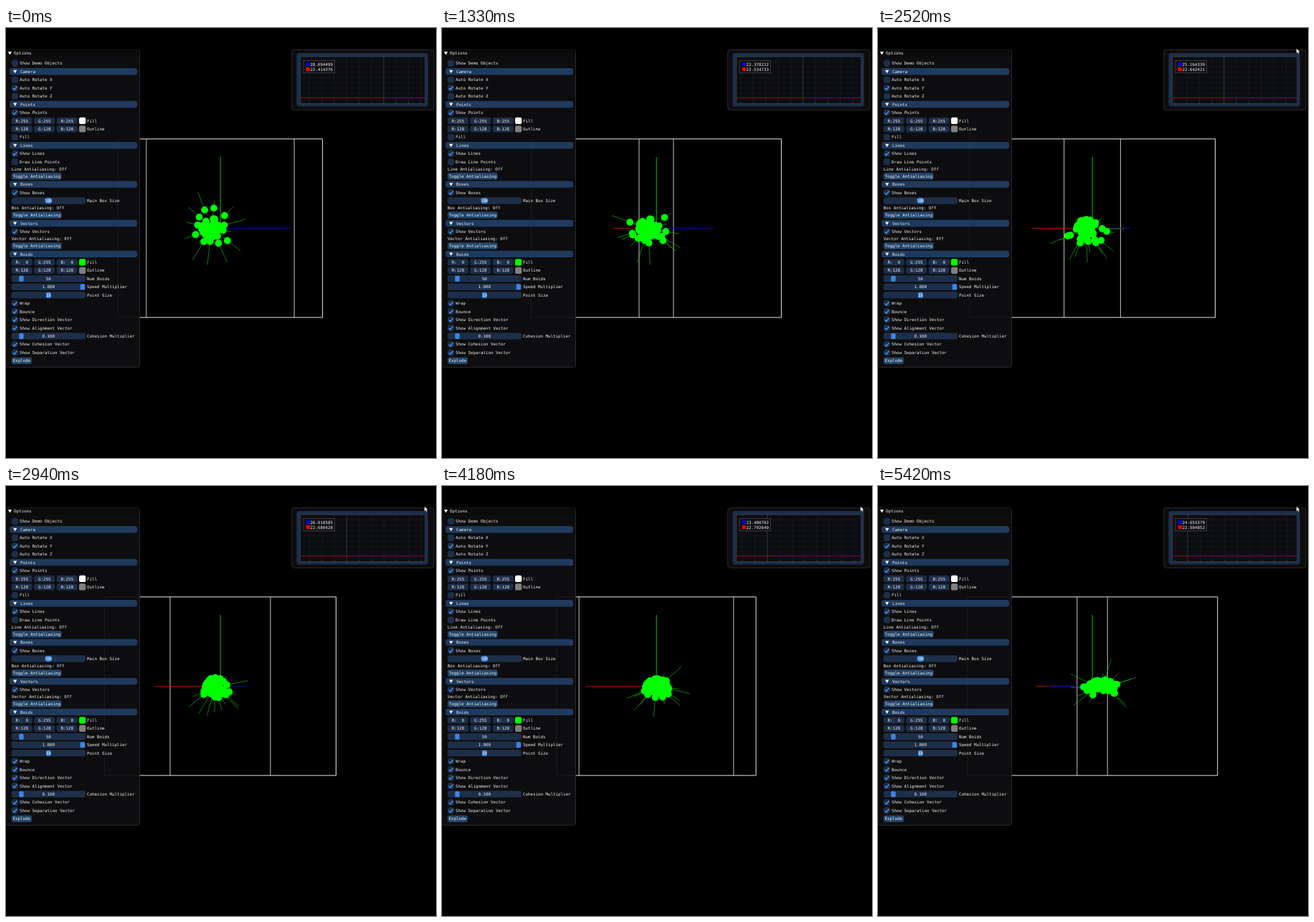
An HTML page for the animation above (5450 ms loop, 600x600 px).

```html
<!DOCTYPE html>
<html lang="en">
<head>
<meta charset="utf-8">
<title>Boids</title>
<style>
html, body { margin: 0; width: 100%; height: 100%; overflow: hidden; background: #000; }
svg { display: block; width: 100vw; height: 100vh; }
text { font: 5.82px "DejaVu Sans Mono", monospace; fill: #f2f2f2; white-space: pre; text-rendering: geometricPrecision; }
.mid { text-anchor: middle; }
.line { fill: none; stroke-width: 1; }
.thin { fill: none; stroke-width: .7; }
.win { fill: rgba(14,14,16,.94); stroke: #3c3c42; stroke-width: .7; }
</style>
</head>
<body>
<svg id="stage" viewBox="0 0 600 600">
  <g class="line">
    <path id="inner" stroke="#c4c4c4"/>
    <path id="outer" stroke="#e6e6e6"/>
    <path id="xAxis" stroke="#c00000"/>
    <path id="zAxis" stroke="#0c0cb0"/>
    <path d="M299.2 279.4V180" stroke="#00c800"/>
  </g>
  <path id="rays" class="thin" stroke="#18b018"/>
  <path id="dots" fill="#0f0"/>
  <g id="panel"></g>
  <g transform="translate(-.6 0)">
    <rect class="win" x="399.3" y="30.3" width="198.4" height="84" rx="4"/>
    <rect x="406" y="35" width="183.5" height="74.5" rx="4" fill="#1d2e48"/>
    <rect x="411.5" y="40" width="174" height="65.5" fill="#0c0d11"/>
    <clipPath id="plotClip"><rect x="411.5" y="40" width="174" height="66"/></clipPath>
    <g clip-path="url(#plotClip)" class="thin">
      <path id="rows" stroke="#15171c"/>
      <path id="minor" stroke="#1c1e24"/>
      <path id="ticks" stroke="#555862"/>
      <path id="major" stroke="#3c3f48"/>
      <path d="M411 97.4H586" stroke="#c4001c"/>
      <path id="trace" stroke="#1a00e0" stroke-opacity=".62"/>
    </g>
    <rect x="411.5" y="40" width="174" height="65.5" class="thin" stroke="#42454e"/>
    <rect x="415.7" y="45.3" width="43.6" height="17.5" fill="#101013" stroke="#55555c" stroke-width=".6"/>
    <rect x="419.4" y="48" width="5" height="5" fill="#00f"/>
    <rect x="419.4" y="55" width="5" height="5" fill="#f00"/>
    <text id="blueValue" x="425" y="52.7"/>
    <text id="redValue" x="425" y="59.6"/>
  </g>
  <path id="cursor" d="M0 0V7.2L1.7 5.6 2.9 8 4.1 7.4 3 5.1H5.2Z" fill="#fff" stroke="#000" stroke-width=".4"/>
</svg>
<script>
const LOOP = 5450, TAU = 2 * Math.PI;
const MID = { x: 299, y: 279.4, half: 124.5, axis: 100 };
const $ = id => document.getElementById(id);
const draw = (id, d) => $(id).setAttribute('d', d);
const lerp = (a, b, p) => a + (b - a) * p;
const range = n => Array.from({ length: n }, (_, i) => i);

/* ---------- options panel: widgets flow downwards ---------- */
const FRAME = '#1d2e48', GRAB = '#3d85e0', MARK = '#4296fa';
const ROW = 11.45, TEXT_ROW = 10, LEFT = 7.7, SIZE = 9.4, FIELD = 103.3;
let y = 35;
const next = (step = ROW) => { y += step; return ''; };

const box = (x, w, h, fill, r = 3) =>
  `<rect x="${x}" y="${y - h / 2}" width="${w}" height="${h}" rx="${r}" fill="${fill}"/>`;
const label = (x, s, cls = '') => `<text x="${x}" y="${y + 2.1}" class="${cls}">${s}</text>`;
const arrow = x => `<path d="M${x - 2.6} ${y - 2}h5.2l-2.6 4.4z" fill="#fff"/>`;

const header = s => next() + box(5, 178, SIZE, '#1f3a5d') + arrow(12.6) + label(20, s);
const check = (s, on = true) => next() + box(LEFT, SIZE, SIZE, FRAME, 4) + label(19, s) +
  (on ? `<path d="M9.6 ${y + .3}l2 2.2 3.8-4.6" fill="none" stroke="${MARK}" stroke-width="1.4"/>` : '');
const button = (s, w) => box(LEFT, w, SIZE, '#234469') + label(9.4, s);
const slider = (s, value, part, grab = 6.4) => next() + box(LEFT, FIELD, SIZE, FRAME) +
  box(LEFT + 1 + part * (FIELD - 2 - grab), grab, 8, GRAB, 1.5) + label(59.3, value, 'mid') + label(113, s);
const color = (s, rgb) => next() + rgb.map((v, i) =>
  box(LEFT + i * 31.5, 29, SIZE, FRAME) +
  label(22.2 + i * 31.5, 'RGB'[i] + ':' + String(v).padStart(3), 'mid')).join('') +
  box(102, 9.2, 9.2, `rgb(${rgb})`, 2) + label(113, s);
const toggle = s => next(TEXT_ROW) + label(LEFT, s + ' Antialiasing: Off') +
  next(TEXT_ROW) + button('Toggle Antialiasing', 70);

const GRAY = [128, 128, 128];
$('panel').innerHTML = [
  '<rect class="win" x="-.4" y="30.3" width="186.8" height="443" rx="3"/>',
  box(0, 186, SIZE, '#0a0a0a'), arrow(5.4), label(11, 'Options'),
  next(2.85), check('Show Demo Objects', false),
  header('Camera'),
  check('Auto Rotate X', false), check('Auto Rotate Y'), check('Auto Rotate Z', false),
  header('Points'),
  check('Show Points'), color('Fill', [255, 255, 255]), color('Outline', GRAY), check('Fill', false),
  header('Lines'),
  check('Show Lines'), check('Draw Line Points', false), toggle('Line'),
  header('Boxes'),
  check('Show Boxes'), slider('Main Box Size', '500', .5, 7.5), toggle('Box'),
  header('Vectors'),
  check('Show Vectors'), toggle('Vector'),
  header('Boids'),
  color('Fill', [0, 255, 0]), color('Outline', GRAY),
  slider('Num Boids', '50', .1), slider('Speed Multiplier', '1.000', 1), slider('Point Size', '10', .5),
  check('Wrap'), check('Bounce'), check('Show Direction Vector'), check('Show Alignment Vector'),
  slider('Cohesion Multiplier', '0.100', .1),
  check('Show Cohesion Vector'), check('Show Separation Vector'),
  next(), button('Explode', 28.3)
].join('');

/* ---------- camera and frame rate at a few moments ---------- */
const poses = [
  { at: 0, angle: 9.1, fps: 28.703585 },
  { at: 520, angle: 20, fps: 23.97909 },
  { at: 1330, angle: 37.15, fps: 22.37587 },
  { at: 2520, angle: 57.9, fps: 25.162296 },
  { at: 3360, angle: 78.9, fps: 26.870806 },
  { at: 4180, angle: 97.2, fps: 23.48024 },
  { at: 5420, angle: 128.05, fps: 24.052917 }
];
function pose(t, key) {
  const i = Math.max(1, poses.findIndex(p => p.at > t));
  const b = t >= poses.at(-1).at ? poses.length - 1 : i;
  const from = poses[b - 1], to = poses[b];
  return lerp(from[key], to[key], (t - from.at) / (to.at - from.at));
}

function drawBox(t) {
  const a = pose(t, 'angle') * Math.PI / 180, c = Math.cos(a), s = Math.sin(a);
  const wide = MID.half * (Math.abs(c) + Math.abs(s));
  const near = MID.half * Math.abs(Math.abs(c) - Math.abs(s));
  const top = 154.8, bottom = 403.9;
  draw('outer', `M${MID.x - wide} ${top}H${MID.x + wide}V${bottom}H${MID.x - wide}Z`);
  draw('inner', `M${MID.x - near} ${top}V${bottom}M${MID.x + near} ${top}V${bottom}`);
  draw('xAxis', `M${MID.x} ${MID.y}h${-MID.axis * s}`);
  draw('zAxis', `M${MID.x} ${MID.y}h${MID.axis * c}`);
}

/* ---------- flock: a dense core and a loose rim that breathes ---------- */
let seed = 11;
const random = () => (seed = (seed * 16807) % 2147483647) / 2147483647;
const RIM = 12;
const flock = range(50).map(i => ({
  rim: i < RIM,
  r: i < RIM ? 1.15 + .95 * random() : Math.sqrt(random()),
  a: i < RIM ? (i + .6 * random()) / RIM * TAU : random() * TAU,
  spin: (random() - .5) * 1.6,
  ray: 10 + 28 * random()
}));
const dot = ([x, y]) => `M${x - 4.9} ${y}a4.9 4.9 0 1 0 9.8 0a4.9 4.9 0 1 0-9.8 0z`;

function drawFlock(t) {
  const p = t / LOOP, sec = t / 1000;
  const breath = .84 + .16 * Math.cos(sec / 1.2 * TAU);
  const cx = 287 + 25 * p ** 2.6, cy = 280;
  const rx = 14 + 6 * p ** 3, ry = 14 - 5 * p ** 2;
  let dots = '', rays = '';
  for (const b of flock) {
    const a = b.a + b.spin * sec, r = b.r * (b.rim ? breath : 1);
    const ux = Math.cos(a), uy = Math.sin(a);
    const x = cx + rx * r * ux, y = cy + ry * r * uy;
    dots += dot([x, y]);
    if (b.rim) rays += `M${lerp(cx, x, .7)} ${lerp(cy, y, .7)}L${x + b.ray * ux} ${y + b.ray * uy}`;
  }
  draw('dots', dots);
  draw('rays', rays);
}

/* ---------- scrolling frame rate chart ---------- */
draw('rows', range(8).map(i => `M411 ${47.3 + i * 7.3}H586`).join(''));

function drawChart(t) {
  const x0 = 527.6 - .0175 * t, step = 17.3;
  const columns = range(18).map(i => x0 + (i - 8) * step);
  draw('minor', columns.map(x => `M${x} 40V105.5`).join(''));
  draw('ticks', columns.map(x => `M${x} 103.5V105.5`).join(''));
  draw('major', `M${x0} 40V105.5`);
  draw('trace', 'M' + range(80).map(i => {
    const dip = Math.max(0, Math.sin(i * .9) * Math.sin(i * .19 + 4)) * 3.6;
    return `${x0 + 6 + i * 2} ${97 + dip}`;
  }).join('L'));
  $('blueValue').textContent = pose(t, 'fps').toFixed(6);
  $('redValue').textContent = lerp(22.414286, 22.904762, t / 5420).toFixed(6);
}

function drawCursor(t) {
  const p = Math.min(1, Math.max(0, (t - 1680) / 560));
  $('cursor').setAttribute('visibility', t < 1680 ? 'hidden' : 'visible');
  $('cursor').setAttribute('transform', `translate(${lerp(585, 583.8, p)} ${lerp(46, 28.4, p)})`);
}

const start = performance.now();
function tick() {
  const t = Math.max(0, performance.now() - start) % LOOP;
  drawBox(t);
  drawFlock(t);
  drawChart(t);
  drawCursor(t);
  requestAnimationFrame(tick);
}
tick();
</script>
</body>
</html>
```
